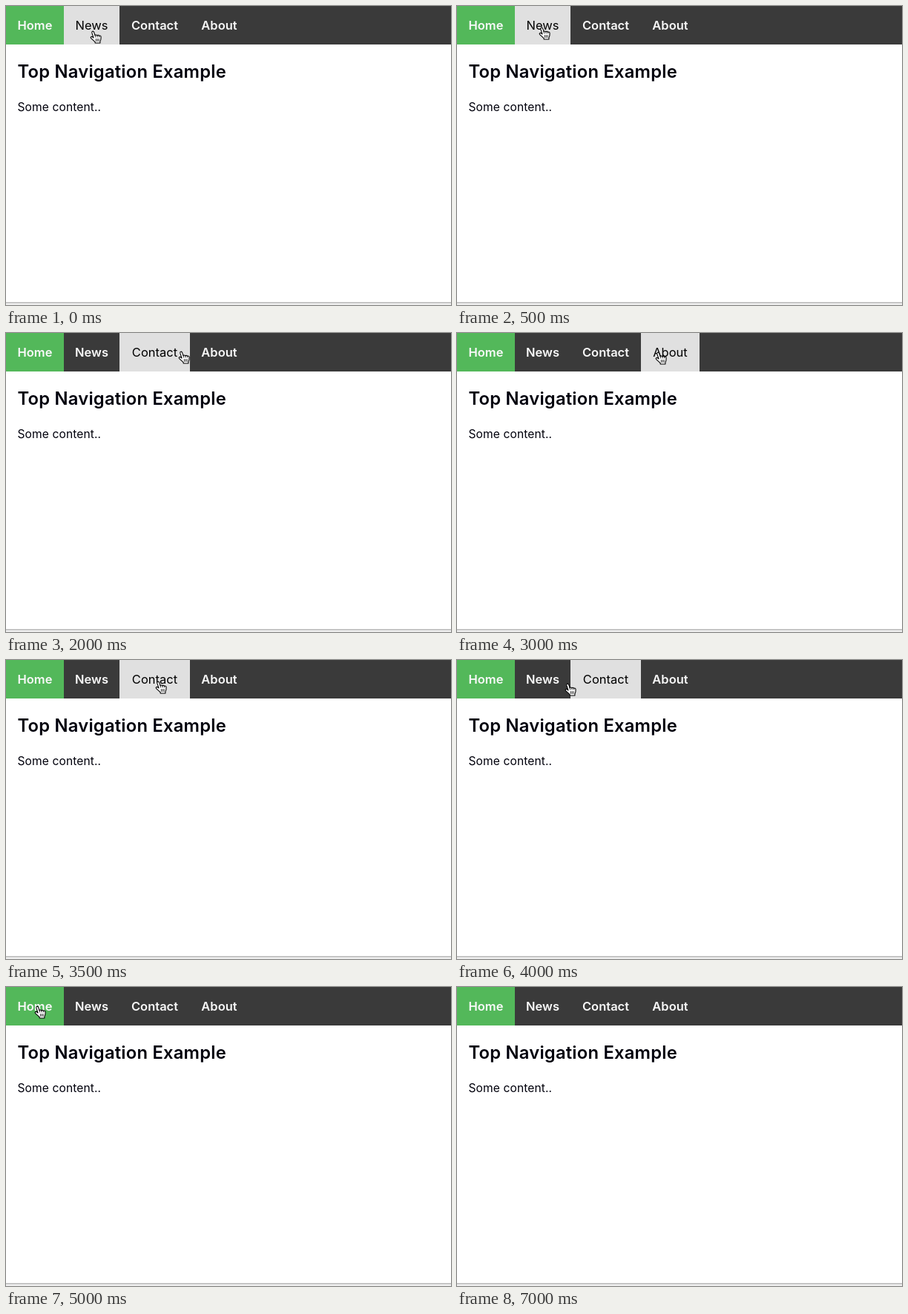
An HTML page that plays this animation: 600 px wide and 404 px high, repeating every 7.5 s.

```html
<!DOCTYPE html>
<html lang="en">
<head>
<meta charset="utf-8">
<title>Top navigation</title>
<style>
  html, body { margin: 0; width: 100%; height: 100%; overflow: hidden; background: #fff; }
  svg { display: block; width: 600px; height: 404px; font-family: Inter, "Open Sans", sans-serif; }
  .title { font-size: 23.8px; font-weight: 560; letter-spacing: .2px; fill: #00000c; }
  .body { font-size: 15.6px; letter-spacing: .09px; fill: #00000c; }
  .tab rect { fill: none; }
  .tab text { font-size: 16.5px; font-weight: 600; fill: #f8f8f8; text-anchor: middle; }
  .tab.active rect { fill: #53b85a; }
  .tab.hover rect { fill: #e0e0e0; }
  .tab.hover text { fill: #000; font-weight: 400; }
</style>
</head>
<body>
<svg viewBox="0 0 600 404">
  <rect width="600" height="52" fill="#3a3a3a"/>
  <g id="tabs"></g>
  <text class="title" x="15.5" y="97">Top Navigation Example</text>
  <text class="body" x="15.5" y="142">Some content..</text>
  <!-- lower window edge and its shadow -->
  <rect y="400" width="600" height="1" fill="#b8b8b8"/>
  <rect y="401" width="600" height="1" fill="#d8d8d8"/>
  <rect y="402" width="600" height="1" fill="#e9e9e9"/>
  <rect y="403" width="600" height="1" fill="#f1f1f1"/>
  <g id="hand" stroke="#000" stroke-linecap="round" stroke-linejoin="round">
    <path fill="#fff" stroke-width="1.1" d="M5 10L2.9 3.4C2.2 1 4.8 .2 5.6 2.4L7.1 6.8C7.7 5.6 9.5 5.8 9.8 7
      C10.5 6 12.2 6.2 12.5 7.4C13.5 6.6 15 7.2 15.1 8.8C15.3 11.6 14.8 13.2 13.9 15V17H7.2V15.8
      C5.8 14.2 3 12 1.5 10.4C.5 9 2.2 7.8 3.6 8.8Z"/>
    <path fill="none" stroke-width=".8" d="M8.4 11.5v3M10.3 11.5v3M12.2 11.5v3M7.1 6.8l.6 2.2M9.8 7l.4 2M12.5 7.4l.2 1.6"/>
  </g>
</svg>
<script>
const STEP = 500;
const HOME = 0, NEWS = 1, CONTACT = 2, ABOUT = 3;
const tabs = [["Home", 0, 78], ["News", 78, 75], ["Contact", 153, 95], ["About", 248, 79]];

// Pointer stops, one per step: x, y, tab under the pointer. The last step has no pointer.
const stops = [
  [113, 33, NEWS], [110, 28, NEWS],
  [162, 26, CONTACT], [174, 23, CONTACT], [232, 24, CONTACT],
  [284, 22, ABOUT], [267, 25, ABOUT],
  [201, 28, CONTACT], [145, 31, CONTACT],
  [115, 32, NEWS],
  [38, 25, HOME], [38, 25, HOME], [47, 27, HOME], [33, 22, HOME],
  null
];

const tabGroup = document.getElementById("tabs");
const hand = document.getElementById("hand");
tabGroup.innerHTML = tabs.map(([label, x, width], i) =>
  `<g class="tab${i === HOME ? " active" : ""}"><rect x="${x}" width="${width}" height="52"/>` +
  `<text x="${x + width / 2}" y="32">${label}</text></g>`).join("");

function draw(time) {
  const stop = stops[Math.floor(time / STEP) % stops.length];
  hand.style.display = stop ? "" : "none";
  if (stop) hand.setAttribute("transform", `translate(${stop[0]} ${stop[1]})`);
  [...tabGroup.children].forEach((tab, i) =>
    tab.classList.toggle("hover", i !== HOME && !!stop && stop[2] === i));
}

const start = performance.now();
function tick() {
  draw(performance.now() - start);
  requestAnimationFrame(tick);
}
tick();
</script>
</body>
</html>
```
